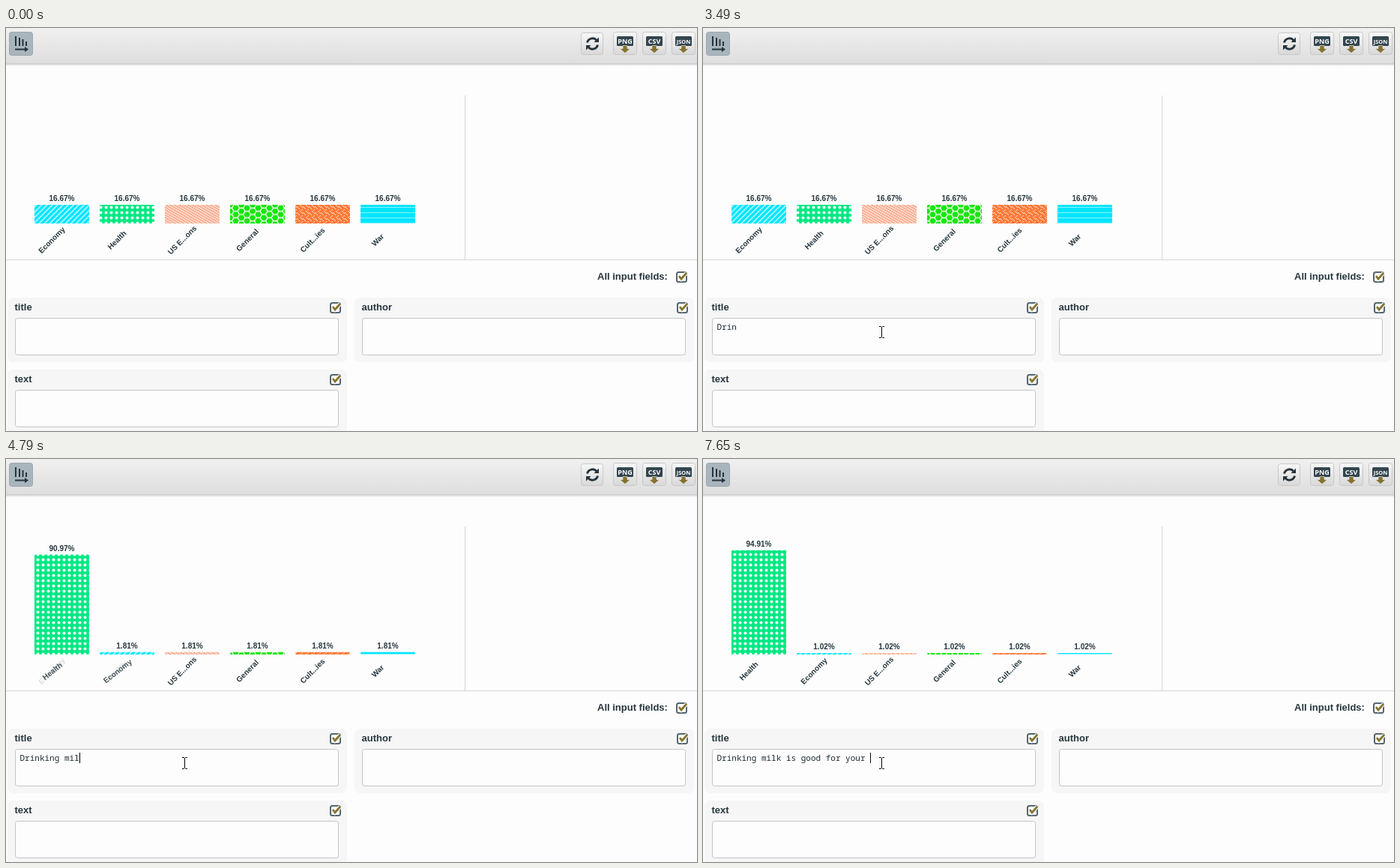
Animation, 922 px wide and 538 px high, one loop 8000 ms. Source, as an HTML page:

```html
<!DOCTYPE html>
<html lang="en">
<head>
<meta charset="utf-8">
<title>Topic prediction</title>
<style>
html, body { margin: 0; width: 100%; height: 100%; overflow: hidden; background: #fdfdfd; }
svg { display: block; width: 100%; height: 100%; }
text { font-family: "Liberation Sans", Arial, sans-serif; font-weight: bold; fill: #26363d; white-space: pre; }
.label { font-size: 13px; }
.chart text { font-size: 10px; text-anchor: middle; }
.badge text { font: bold 9px "Open Sans", sans-serif; fill: #fff; text-anchor: middle; }
#typed { font: 11px "Noto Sans Mono", monospace; fill: #1d2c33; }
.rule { stroke: #d6d6d6; }
</style>
</head>
<body>
<svg viewBox="0 0 922 538">
  <defs>
    <linearGradient id="bar" x2="0" y2="1">
      <stop stop-color="#f0f0f0"/><stop offset="1" stop-color="#dedede"/>
    </linearGradient>
    <linearGradient id="shade" x2="0" y2="1">
      <stop stop-color="#c6c6c6"/><stop offset="1" stop-color="#fdfdfd"/>
    </linearGradient>
    <linearGradient id="button" x2="0" y2="1">
      <stop stop-color="#f8f8f8"/><stop offset="1" stop-color="#d8d8d8"/>
    </linearGradient>

    <pattern id="stripes" width="5" height="5" patternUnits="userSpaceOnUse" patternTransform="rotate(45)">
      <path fill="#00e5ff" d="M0 0h5v5H0z"/><path fill="#fff" fill-opacity=".85" d="M0 0h1.400v5H0z"/>
    </pattern>
    <pattern id="dots" x="39" y="236" width="7" height="7" patternUnits="userSpaceOnUse">
      <path fill="#00e884" d="M0 0h7v7H0z"/><circle cx="3.5" cy="3.5" r="2" fill="#fff"/>
    </pattern>
    <pattern id="mesh" width="3" height="3" patternUnits="userSpaceOnUse" patternTransform="rotate(30)">
      <path fill="#fba586" d="M0 0h3v3H0z"/><path stroke="#fff" stroke-width=".9" stroke-opacity=".8" d="M0 .5h3M.5 0v1.800"/>
    </pattern>
    <pattern id="hexes" x="299" y="236" width="15" height="8.66" patternUnits="userSpaceOnUse">
      <path fill="#18e60a" d="M0 0h15v9H0z"/>
      <path fill="none" stroke="#fff" stroke-width="1.3" d="M0 4.330h2.500L5 0h5l2.500 4.330L10 8.660H5L2.500 4.330M12.500 4.330H15"/>
    </pattern>
    <pattern id="woven" x="386" y="236" width="8" height="8" patternUnits="userSpaceOnUse">
      <path fill="#ff7a38" d="M0 0h8v8H0z"/>
      <path stroke="#fff" stroke-opacity=".8" d="M2 2l4 4M6 0l4 4M2 6l-4 4M6 10l4-4M-2 2l4-4M-2 0l4 4"/>
    </pattern>
    <pattern id="lines" y="236" width="8" height="7" patternUnits="userSpaceOnUse">
      <path fill="#00e5ff" d="M0 0h8v7H0z"/><path fill="#fff" fill-opacity=".55" d="M0 3h8v1H0z"/>
    </pattern>

    <g id="check">
      <rect x="-6.5" y="-6" width="13" height="13" rx="2.5" fill="#fff" stroke="#556570" stroke-width="2"/>
      <path d="M-3.500-1L-.5 3L6.500-5" fill="none" stroke="#fdfdfd" stroke-width="5"/>
      <path d="M-3.500-1L-.5 3L6.500-5" fill="none" stroke="#85742f" stroke-width="2.8"/>
    </g>
  </defs>

  <path fill="#fdfdfd" d="M0 0h922v538H0z"/>
  <path fill="url(#bar)" d="M0 0h922v47H0z"/>
  <path fill="url(#shade)" d="M0 47h922v4H0z"/>

  <rect x="4.5" y="5.5" width="31" height="31" rx="3" fill="#a9b5bc" stroke="#9ba7ae"/>
  <g fill="none" stroke="#26343d" stroke-width="2">
    <path d="M13 11v13M18 13v11M22.500 15v9M27 18v6M12 28.500h14"/>
    <path fill="#26343d" stroke="none" d="M25 25l5 3.500l-5 3.500z"/>
  </g>

  <rect x="767.5" y="6.5" width="29" height="29" rx="3" fill="url(#button)" stroke="#c8c8c8"/>
  <g transform="translate(782.5 21)">
    <path id="half" fill="none" stroke="#26343d" stroke-width="3" d="M-7-1.500A7.200 7.200 0 0 1 5.500-4.600"/>
    <path id="tip" fill="#26343d" d="M8.500-8.500v6.500h-6.500z"/>
    <use href="#half" transform="rotate(180)"/><use href="#tip" transform="rotate(180)"/>
  </g>
  <g id="badges"></g>

  <path class="rule" d="M612.500 90V309M0 309.500H922"/>
  <g class="chart" id="chart"></g>

  <text class="label" x="789" y="336">All input fields:</text>
  <use href="#check" x="901.5" y="332"/>
  <g id="panels"></g>

  <text id="typed" x="18.5" y="403"></text>
  <path id="caret" stroke="#000" d="M.5 392v14"/>
  <g id="mouse">
    <path id="beam" fill="none" stroke="#000" d="M-3.500-7.500h2.500l1 1l1-1h2.500M0-6.500v13M-3.500 7.500h2.500l1-1l1 1h2.500"/>
    <path id="arrow" fill="#fff" stroke="#000" d="M.5.5v16l3.700-3.500l2.600 5.500l2.200-1l-2.500-5.500h5z"/>
  </g>
</svg>

<script>
const LOOP = 8000;
const $ = id => document.getElementById(id);

function add(parent, tag, attrs = {}, content = '') {
  const node = document.createElementNS('http://www.w3.org/2000/svg', tag);
  set(node, attrs);
  node.textContent = content;
  return parent.appendChild(node);
}
function set(node, attrs) {
  for (const key in attrs) node.setAttribute(key, attrs[key]);
}
const show = (node, on) => node.style.display = on ? '' : 'none';
const clamp = u => Math.min(1, Math.max(0, u));
const cubic = u => (u = clamp(u)) < .5 ? 4 * u ** 3 : 1 - 4 * (1 - u) ** 3;
const hold = (t, start, step, count) =>
  start + step * Math.min(count, Math.floor((t - start) / step));

// Static parts
[['PNG', 810], ['CSV', 849], ['JSON', 888]].forEach(([name, x]) => {
  const g = add($('badges'), 'g', { class: 'badge', transform: `translate(${x} 0)` });
  add(g, 'rect', { x: .5, y: 5.5, width: 31, height: 30, rx: 3, fill: 'url(#button)', stroke: '#c8c8c8' });
  add(g, 'rect', { x: 5, y: 11, width: 22, height: 13, rx: 1.5, fill: '#34464f' });
  add(g, 'path', { d: 'M13 23.500h6v4h4l-7 6l-7-6h4z', fill: '#857232', stroke: '#eee', 'stroke-width': .6 });
  const label = add(g, 'text', { x: 16, y: 21 }, name);
  if (name.length > 3) label.style.fontSize = '7.5px';
});

[['title', 2, 360], ['author', 465, 360], ['text', 2, 456]].forEach(([name, x, y]) => {
  const g = add($('panels'), 'g', { transform: `translate(${x} ${y})` });
  add(g, 'rect', { width: 453, height: 86, rx: 7, fill: '#f6f6f6' });
  add(g, 'text', { class: 'label', x: 9.5, y: 17 }, name);
  add(g, 'use', { href: '#check', x: 437.5, y: 13 });
  add(g, 'rect', { x: 10.5, y: 27.5, width: 431, height: 49, rx: 3, fill: '#fdfdfd', stroke: '#c4c4c4' });
});

// Chart
const topics = [
  ['Economy', 'stripes'], ['Health', 'dots'], ['US E...ons', 'mesh'],
  ['General', 'hexes'], ['Cult...ies', 'woven'], ['War', 'lines']
];
const SWAP = 4480;
const BASE = 261;

const columns = topics.map(([name], i) => {
  const x = 38 + 87 * i;
  return {
    x,
    bar: add($('chart'), 'rect', { x, width: 73, rx: 1.5 }),
    value: add($('chart'), 'text', { x: x + 36.5 }),
    old: add($('chart'), 'text', { y: 3.5 }, name),
    fresh: i < 2 ? add($('chart'), 'text', { y: 3.5 }, topics[1 - i][0]) : null
  };
});

function tilt(label, x, turn, opacity) {
  const rest = 1 - turn;
  set(label, {
    transform: `translate(${x + 23 + 5.5 * rest} ${283 + 1.5 * rest}) rotate(${-45 * turn})`,
    opacity
  });
}

function drawChart(time) {
  const swapped = time >= SWAP;
  const t = !swapped ? 0 : time < 5260 ? hold(time, SWAP, 77.5, 8) : hold(time, 5260, 78, 5);
  const even = 100 / 6;
  const lead = even + (93 - even) * cubic((t - 4397) / 484) + 1.91 * cubic((t - 5200) / 450);
  const turn = cubic((t - 4460) / 500);

  columns.forEach(({ x, bar, value, old, fresh }, i) => {
    const share = i ? (100 - lead) / 5 : lead;
    const height = 1.46 * share + .6;
    const topic = topics[swapped && i < 2 ? 1 - i : i];
    set(bar, { y: BASE - height, height, fill: `url(#${topic[1]})` });
    value.textContent = share.toFixed(2) + '%';
    set(value, { y: Math.round(BASE - height - 4.7) });
    tilt(old, x, 1, fresh ? 1 - turn : 1);
    if (fresh) tilt(fresh, x, turn, turn);
  });
}

// Typing
const message = 'Drinking milk is good for your ';
const keyTimes = [
  2570, 2710, 2790, 2950, 3640, 3790, 3960, 4100, 4250,
  4480, 4640, 4790, 4870, 5030, 5260, 5420, 5570, 5800, 5880, 6030,
  6180, 6260, 6410, 6490, 6640, 6720, 7040, 7120, 7340, 7570, 7650
];

function drawTyping(t) {
  const count = keyTimes.filter(k => k <= t).length;
  $('typed').textContent = message.slice(0, count);
  set($('caret'), { transform: `translate(${Math.round(18.95 + 6.598 * count)} 0)` });
  show($('caret'), t >= 1400 && !(t >= 1850 && t < 2390) && !(t >= 3490 && t < 3640));
}

// Pointer glides in, then rests over the first field
function drawMouse(t) {
  const rest = (1 - clamp((hold(t, 300, 78, 5) - 300) / 390)) ** 1.7;
  const x = Math.round(238 + 429 * rest) + .5;
  const y = Math.round(406 + 100 * rest);
  const overField = x < 444 && y < 437;
  set($('mouse'), { transform: `translate(${x} ${y})` });
  show($('mouse'), t >= 300);
  show($('beam'), overField);
  show($('arrow'), !overField);
}

const start = performance.now();
function draw() {
  const t = (performance.now() - start) % LOOP;
  drawChart(t);
  drawTyping(t);
  drawMouse(t);
  requestAnimationFrame(draw);
}
draw();
</script>
</body>
</html>
```
